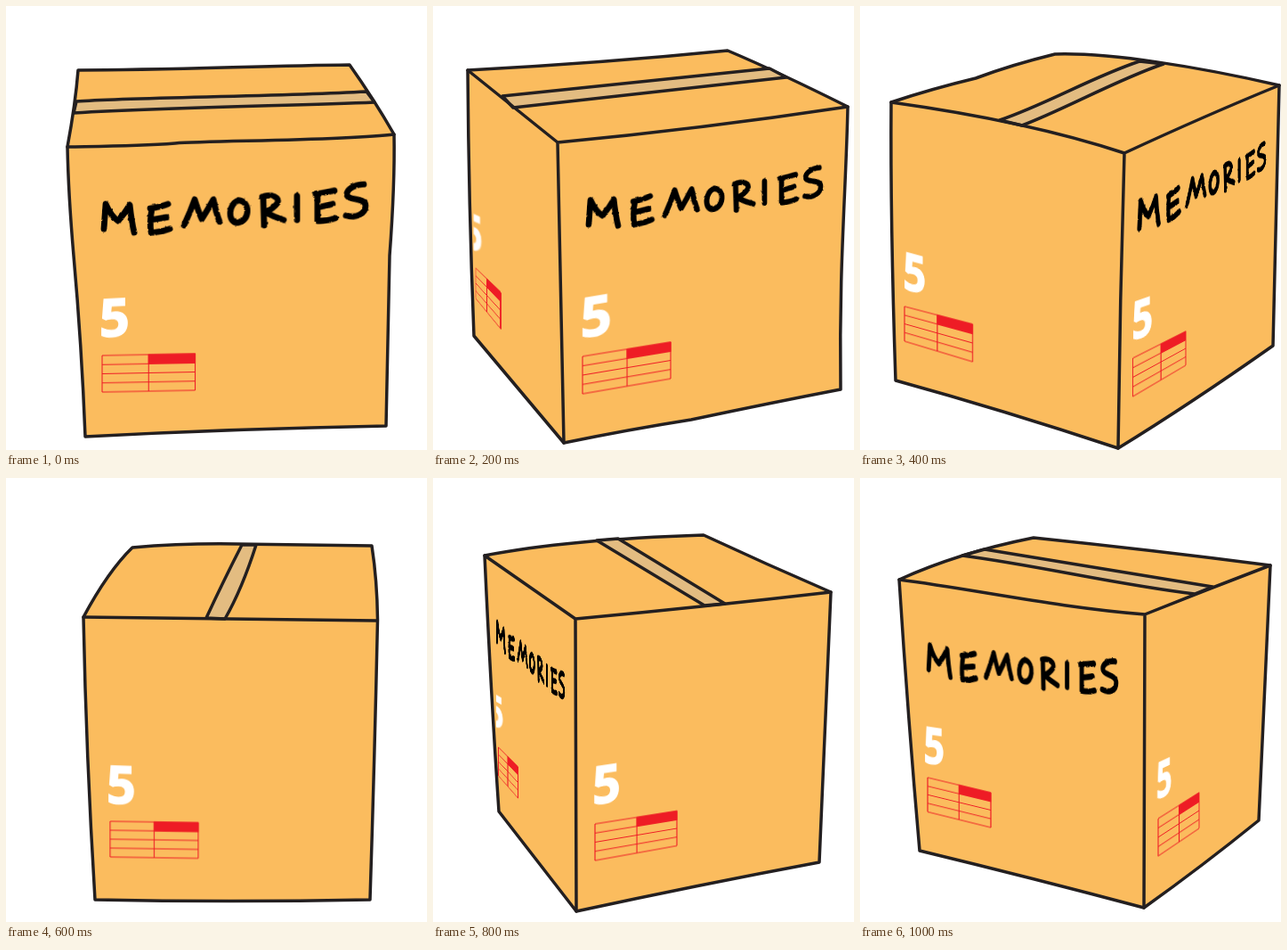
An HTML page without scripts for the animation above (1200 ms loop, 473 by 498 pixels).

```html
<!DOCTYPE html>
<html lang="en">
<head>
<meta charset="utf-8">
<title>Turning box</title>
<style>
html, body { margin: 0; width: 100%; height: 100%; overflow: hidden; background: #fff; }
.pose, .pose > svg { position: absolute; left: 0; top: 0; }
.pose { width: 473px; height: 498px; visibility: hidden; animation: show 1.2s step-end infinite; animation-delay: calc(var(--n) * .2s - 1.2s); }
@keyframes show { 0% { visibility: visible; } 16.6667%, 100% { visibility: hidden; } }

.box { width: 473px; height: 498px; fill: none; stroke: #231f20; stroke-width: 3.5; stroke-linecap: round; stroke-linejoin: round; }
.card { fill: #fbbc5e; }
.tape { fill: #e3bc81; }

/* Perspective fit: left edge at x0,y0 with height h0, right edge at x1,y1 with height h1 */
.mark {
  width: calc(var(--w) * 1px); height: calc(var(--h) * 1px); overflow: visible;
  --k: calc(var(--h0) / var(--h1));
  transform-origin: 0 0;
  transform: matrix3d(
    calc((var(--x1) * var(--k) - var(--x0)) / var(--w)), calc((var(--y1) * var(--k) - var(--y0)) / var(--w)), 0, calc((var(--k) - 1) / var(--w)),
    0, calc(var(--h0) / var(--h)), 0, 0,
    0, 0, 1, 0,
    var(--x0), var(--y0), 0, 1);
}
.word { --w: 300; --h: 41; --ink: 6.8; }
.five { --w: 29; --h: 43.5; }
.grid { --w: 104; --h: 41; }
.half { clip-path: inset(-5px -5px -5px 50%); }
#word { fill: none; stroke: #000; stroke-width: var(--ink); stroke-linecap: round; stroke-linejoin: round; }
#five { font: 700 59px "Open Sans", "Noto Sans", sans-serif; fill: #fff; stroke: #fff; stroke-width: 1.6; }
#grid { fill: none; stroke: #ee1c25; stroke-width: 1.1; }
#grid .v { stroke-width: calc(110px / (var(--x1) - var(--x0))); }
</style>
</head>
<body>
<svg width="0" height="0" style="position:absolute">
  <defs>
    <filter id="rough" x="-5%" y="-20%" width="110%" height="140%" color-interpolation-filters="sRGB">
      <feTurbulence type="fractalNoise" baseFrequency=".2" numOctaves="2" seed="4"/>
      <feDisplacementMap in="SourceGraphic" scale="2.4" xChannelSelector="R" yChannelSelector="G"/>
    </filter>
    <g id="word" filter="url(#rough)">
      <g transform="matrix(1 .075 0 1 -107 -227)">
        <path d="M110 250L112 222Q118 236 126 241Q133 233 139 223Q141 242 144 254"/>
        <path d="M162 227Q174 225 182 222M164 227Q161 242 163 254Q174 254 184 250M163 240L180 237"/>
        <path d="M200 246Q207 231 212 217Q216 230 220 239Q227 228 233 217Q236 232 240 242"/>
        <path d="M262 218C250 220 248 243 260 243C273 243 276 220 262 218Z"/>
        <path d="M289 215L290 246M288 214C299 210 308 215 305 221Q300 228 291 231Q302 237 312 240"/>
        <path d="M327 213L327 240"/>
        <path d="M348 211Q360 209 369 207M350 210L350 241Q362 241 370 238M350 226L367 222"/>
        <path d="M402 200C391 200 383 206 383 211C383 219 404 214 404 224C404 234 392 238 382 235"/>
      </g>
    </g>
    <text id="five" x="-2" y="42.7">5</text>
    <g id="grid">
      <path fill="#ee1c25" d="M52 0H104V10.25H52Z"/>
      <path d="M0 0H104M0 10.25H104M0 20.5H104M0 30.75H104M0 41H104"/>
      <path class="v" d="M0 0V41M52 0V41M104 0V41"/>
    </g>
  </defs>
</svg>

<div class="pose" style="--n:0">
  <svg class="box">
    <path class="card" d="M81 72C180 72 290 67 386 66Q413 104 436 144Q437 200 431 280L427 471Q260 474 89 483Q85 380 76 280Q70 210 69 158Q78 110 81 72Z"/>
    <path class="tape" d="M79 107C140 102 300 102 405 96L414 108C320 112 200 113 76 120Z"/>
    <path d="M69 158C130 157 150 157 190 154S380 151 436 144"/>
  </svg>
  <svg class="mark word" style="--x0:107;--y0:219;--h0:41;--x1:407;--y1:196.5;--h1:41"><use href="#word"/></svg>
  <svg class="mark five" style="--x0:107;--y0:329;--h0:43;--x1:136;--y1:327.5;--h1:43"><use href="#five"/></svg>
  <svg class="mark grid" style="--x0:108;--y0:392;--h0:41;--x1:212.5;--y1:390;--h1:41"><use href="#grid"/></svg>
</div>

<div class="pose" style="--n:1">
  <svg class="box">
    <path class="card" d="M39 72Q190 64 331 50Q390 75 466 113C464 210 456 290 458 430Q380 445 290 464Q220 475 147 490L46 370Q40 220 39 72Z"/>
    <path class="tape" d="M78 101L378 70L397 80L90 114Z"/>
    <path d="M39 72L140 153Q300 138 466 113M140 153Q144 320 147 490"/>
  </svg>
  <svg class="mark word" style="--x0:172;--y0:215;--h0:40;--x1:438;--y1:178;--h1:36"><use href="#word"/></svg>
  <svg class="mark five" style="--x0:168;--y0:328;--h0:45;--x1:198;--y1:323;--h1:45"><use href="#five"/></svg>
  <svg class="mark grid" style="--x0:168;--y0:393;--h0:42;--x1:267;--y1:377;--h1:41"><use href="#grid"/></svg>
  <svg class="mark five half" style="--x0:38;--y0:231;--h0:39;--x1:54;--y1:238;--h1:39"><use href="#five"/></svg>
  <svg class="mark grid" style="--x0:48;--y0:294;--h0:34;--x1:76;--y1:321;--h1:41"><use href="#grid"/></svg>
</div>

<div class="pose" style="--n:2">
  <svg class="box">
    <path class="card" d="M35 108Q80 93 130 81Q170 66 219 54C280 52 380 68 471 89Q467 240 464 381Q370 447 290 496Q160 453 40 420Q34 240 35 108Z"/>
    <path class="tape" d="M157 128C210 110 260 80 314 62L341 65C290 82 230 116 182 134Z"/>
    <path d="M35 108C100 117 200 133 297 165Q390 122 471 89M297 165Q292 330 290 496"/>
  </svg>
  <svg class="mark word" style="--x0:312;--y0:217;--h0:43;--x1:456;--y1:151;--h1:31;--ink:7.5"><use href="#word"/></svg>
  <svg class="mark five" style="--x0:50;--y0:275;--h0:43;--x1:72;--y1:281;--h1:42"><use href="#five"/></svg>
  <svg class="mark grid" style="--x0:50;--y0:337;--h0:39;--x1:126.5;--y1:357;--h1:42"><use href="#grid"/></svg>
  <svg class="mark five" style="--x0:307;--y0:332;--h0:44;--x1:327;--y1:325;--h1:44"><use href="#five"/></svg>
  <svg class="mark grid" style="--x0:306.5;--y0:395;--h0:43;--x1:366;--y1:365;--h1:38"><use href="#grid"/></svg>
</div>

<div class="pose" style="--n:3">
  <svg class="box">
    <path class="card" d="M142 78Q200 73 260 74T411 76Q417 115 417.5 159Q414 320 409 473Q250 476 100 473Q90 310 87 156Q115 104 142 78Z"/>
    <path class="tape" d="M265 75Q243 118 225 157L246 158Q265 125 281 75Z"/>
    <path d="M87 156L417 160"/>
  </svg>
  <svg class="mark five" style="--x0:115;--y0:322;--h0:44;--x1:143;--y1:323;--h1:44"><use href="#five"/></svg>
  <svg class="mark grid" style="--x0:117;--y0:385;--h0:40;--x1:216;--y1:386.5;--h1:40"><use href="#grid"/></svg>
</div>

<div class="pose" style="--n:4">
  <svg class="box">
    <path class="card" d="M58 87Q150 69 304 64Q375 97 447 128Q441 260 434 431Q300 456 161 486L74 374Q65 240 58 87Z"/>
    <path class="tape" d="M184 70L305 143L328 141L208 68Z"/>
    <path d="M58 87L160 158Q300 145 447 128M160 158L161 486"/>
  </svg>
  <svg class="mark word" style="--x0:71;--y0:158;--h0:32;--x1:148;--y1:219;--h1:31;--ink:8"><use href="#word"/></svg>
  <svg class="mark five" style="--x0:181;--y0:324;--h0:43;--x1:208;--y1:320;--h1:43"><use href="#five"/></svg>
  <svg class="mark grid" style="--x0:182;--y0:388;--h0:41;--x1:274;--y1:373.5;--h1:39"><use href="#grid"/></svg>
  <svg class="mark five half" style="--x0:64;--y0:240;--h0:36;--x1:78;--y1:248;--h1:36"><use href="#five"/></svg>
  <svg class="mark grid" style="--x0:73.5;--y0:302;--h0:32;--x1:95.5;--y1:324;--h1:35"><use href="#grid"/></svg>
</div>

<div class="pose" style="--n:5">
  <svg class="box">
    <path class="card" d="M44 114Q110 84 195 67Q330 81 461 98Q453 270 448 384Q385 435 319 482Q195 449 67 418Q54 270 44 114Z"/>
    <path class="tape" d="M115 87C200 98 290 120 376 130L396 122C310 108 220 93 140 80Z"/>
    <path d="M44 114C130 125 220 145 320 153Q390 125 461 98M320 153L319 482"/>
  </svg>
  <svg class="mark word" style="--x0:75;--y0:184;--h0:40;--x1:290;--y1:203;--h1:40"><use href="#word"/></svg>
  <svg class="mark five" style="--x0:73;--y0:278;--h0:42;--x1:93;--y1:281;--h1:41"><use href="#five"/></svg>
  <svg class="mark grid" style="--x0:76;--y0:336;--h0:38.5;--x1:147;--y1:353;--h1:39"><use href="#grid"/></svg>
  <svg class="mark five" style="--x0:334;--y0:320;--h0:41;--x1:349;--y1:313;--h1:41"><use href="#five"/></svg>
  <svg class="mark grid" style="--x0:335;--y0:382;--h0:42;--x1:381;--y1:353;--h1:40"><use href="#grid"/></svg>
</div>
</body>
</html>
```
